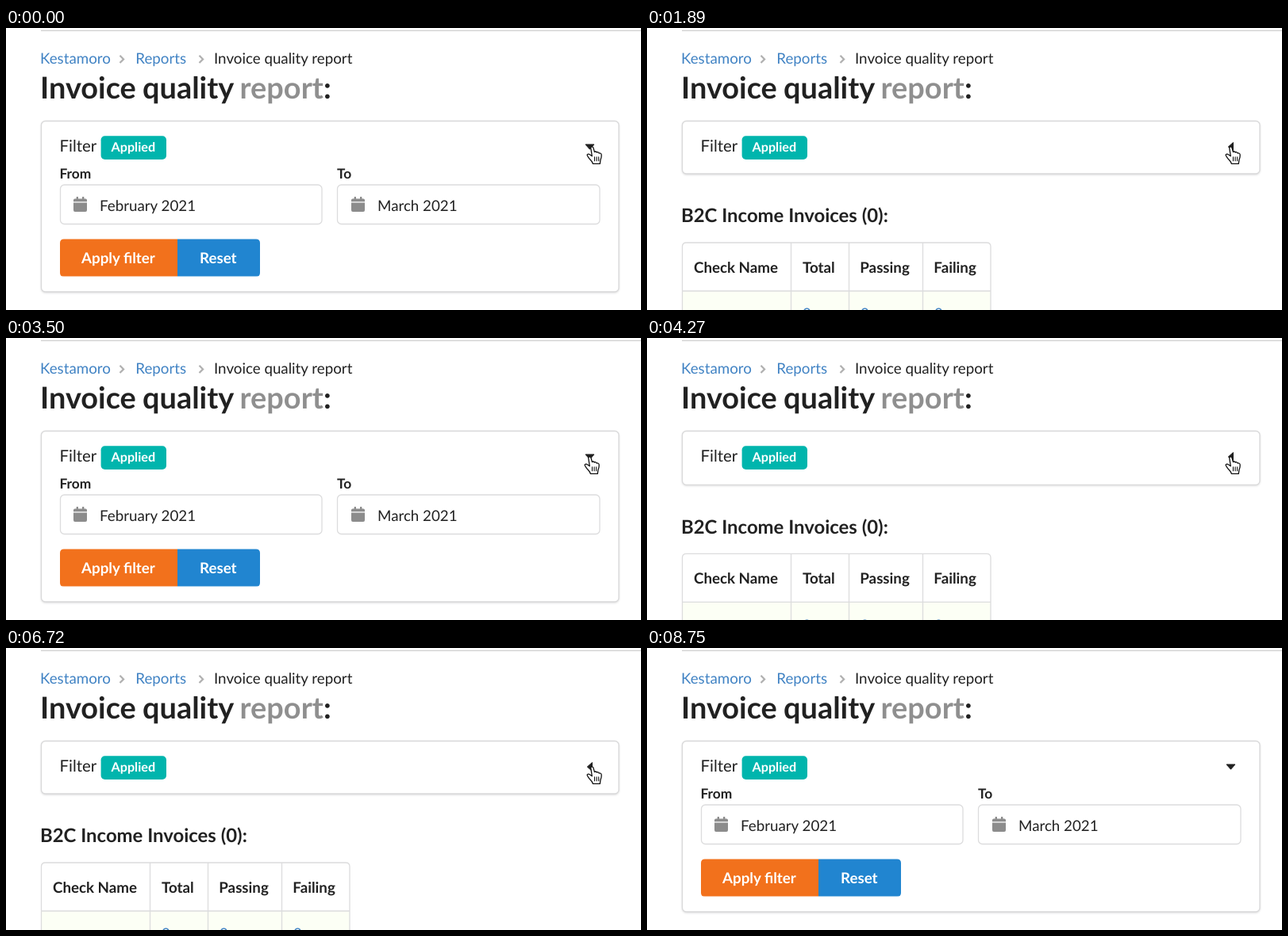
An HTML page that plays this animation: 800x356 px, repeating every 8.82 s.

```html
<!DOCTYPE html>
<html lang="en">
<head>
<meta charset="utf-8">
<title>Invoice quality report</title>
<style>
  html, body { margin: 0; width: 100%; height: 100%; overflow: hidden; background: #fff; }
  svg { display: block; width: 800px; height: 356px; }
  text { font: 18.75px Lato, sans-serif; fill: #212121; text-rendering: geometricPrecision; }
  .b { font-weight: 700; }
  .h1 { font-size: 37.9px; word-spacing: -1px; }
  .h3 { font-size: 23.9px; }
  .title { font-size: 20.4px; }
  .badge { font-size: 16.2px; }
  .label { font-size: 17.33px; }
  .link { fill: #4183c4; }
  .muted { fill: #8f8f8f; }
  .light { fill: #fff; }
  .chevron { fill: none; stroke: #b0b0b0; stroke-width: 2.2; }
  .line { fill: none; stroke: #dcdcdd; stroke-width: 1.3; }
  .field { fill: #fff; stroke: #dcdcdd; stroke-width: 1.3; }
  #box { fill: #fff; stroke: #d9d9da; stroke-width: 1.3; filter: drop-shadow(0 1.3px 1.2px rgba(34, 36, 38, .15)); }
</style>
</head>
<body>
<svg viewBox="0 0 800 356">
  <defs>
    <clipPath id="clip"><rect id="clipBox" x="44" y="166" width="728"/></clipPath>
    <g id="calendar" fill="#8c8c8c">
      <path d="M0 6.2V4.3Q0 2.4 1.9 2.4H3.6V.6Q3.6 0 4.2 0H5.4Q6 0 6 .6V2.4H11V.6Q11 0 11.6 0H12.8Q13.4 0 13.4 .6V2.4H15.1Q17 2.4 17 4.3V6.2Z"/>
      <path d="M0 7.4H17V17.1Q17 19 15.1 19H1.9Q0 19 0 17.1Z"/>
    </g>
  </defs>

  <path d="M44 3.3H800" stroke="#cfcfcf" stroke-width="1.3"/>
  <text class="link" x="43" y="45">Kestamoro</text>
  <path class="chevron" d="M143.5 34.8l4.6 4.6-4.6 4.6M243.5 34.8l4.6 4.6-4.6 4.6"/>
  <text class="link" x="163.3" y="45">Reports</text>
  <text x="262" y="45">Invoice quality report</text>
  <text class="b h1" x="43" y="89">Invoice quality <tspan class="muted">report</tspan>:</text>

  <g id="below">
    <text class="b h3" x="43" y="245.3">B2C Income Invoices (0):</text>
    <path d="M44.5 332H433V420H44.5Z" fill="#fcfff5"/>
    <path class="line" d="M44.5 420V276Q44.5 271 49.5 271H428Q433 271 433 276V420M44.5 332H433M181.5 271V420M254.5 271V420M347.5 271V420"/>
    <text class="b" x="59" y="308.5">Check Name</text>
    <text class="b" x="196" y="308.5">Total</text>
    <text class="b" x="268.3" y="308.5">Passing</text>
    <text class="b" x="361.3" y="308.5">Failing</text>
    <text class="link" x="196" y="367.3">0</text>
    <text class="link" x="269" y="367.3">0</text>
    <text class="link" x="362" y="367.3">0</text>
  </g>

  <rect id="box" x="44.5" y="117.5" width="727.5" rx="5"/>
  <text class="title" x="67.5" y="156.2">Filter</text>
  <rect x="119.6" y="136.3" width="82.4" height="29.7" rx="5" fill="#00b5ad"/>
  <text class="b badge light" x="132.5" y="156.4">Applied</text>
  <path id="caret" d="M730 147H741L735.5 153.2Z" fill="#212121" stroke="#212121" stroke-linejoin="round"/>

  <g clip-path="url(#clip)">
    <g id="content">
      <text class="b label" x="67.5" y="189.5">From</text>
      <text class="b label" x="417" y="189.5">To</text>
      <rect class="field" x="68.5" y="198" width="329.5" height="49.5" rx="5"/>
      <rect class="field" x="417.5" y="198" width="330.5" height="49.5" rx="5"/>
      <use href="#calendar" x="85" y="213"/>
      <use href="#calendar" x="435" y="213"/>
      <text x="118" y="230.5">February 2021</text>
      <text x="468" y="230.5">March 2021</text>
      <path d="M216 266.5V314H73Q68 314 68 309V271.5Q68 266.5 73 266.5Z" fill="#f2711c"/>
      <path d="M216 266.5V314H315Q320 314 320 309V271.5Q320 266.5 315 266.5Z" fill="#2185d0"/>
      <text class="b light" x="95" y="297">Apply filter</text>
      <text class="b light" x="244" y="297">Reset</text>
    </g>
  </g>

  <g id="hand" stroke="#111" stroke-width="1.3" stroke-linejoin="round" stroke-linecap="round">
    <path fill="#fff" transform="translate(-6 -.4)" d="M5.2 3C5.6 1.4 7.8 1.4 8.4 3L10 8.4C10.6 7.6 12.4 7.7 12.8 9C13.6 8.3 15.4 8.6 15.7 10C16.8 9.5 18.6 10.2 18.7 11.9C19 15 18.4 16.5 17.4 19L16.8 23.2H7.8C7.6 20.5 4.5 18.5 2.8 16C1.6 14.2 .6 13.2 .6 12C1 10.6 3 10.7 4 11.6L6.8 13.6Z"/>
    <path d="M4 14.4v4.8M6.6 14.4v4.8M9.2 14.4v4.8" stroke-width="1.1"/>
  </g>
  <path id="arrow" d="M0 0V17.5L4 13.8L7.1 21.4L10.2 20.1L7.1 12.8H12.3Z" fill="#111" stroke="#fff" stroke-width="1.2"/>
</svg>
<script>
const LOOP = 8820, STEP = 70, SLIDE = 350, FULL = 149;
const $ = id => document.getElementById(id);
const set = (id, attrs) => {
  for (const name in attrs) $(id).setAttribute(name, attrs[name]);
};

// Start times; the panel begins open and every click toggles it.
const clicks = [1358, 2546, 3953, 4650, 6250, 7050];

// time, x, y of the pointer's hot spot
const route = [
  [0, 737.5, 148.5], [900, 737.5, 148.5], [1100, 734.5, 148.5], [4970, 734.5, 148.5],
  [5250, 757, 163], [5850, 757, 163], [6150, 737.5, 148.5], [7420, 737.5, 148.5],
  [7700, 540, 70], [7840, 500, -26]
];

function panelAt(t) {
  const done = clicks.filter(c => c <= t);
  const open = done.length % 2 === 0;
  const p = done.length ? Math.min(1, (t - done[done.length - 1]) / SLIDE) : 1;
  const eased = 1 - (1 - p) ** 2;
  return { open, part: open ? eased : 1 - eased };
}

function pointerAt(t) {
  const i = route.findIndex(r => r[0] > t);
  if (i < 0) return null;
  const [t0, x0, y0] = route[i - 1], [t1, x1, y1] = route[i];
  const p = (t - t0) / (t1 - t0), s = p * p * (3 - 2 * p);
  return { x: x0 + (x1 - x0) * s, y: y0 + (y1 - y0) * s };
}

function drawPanel(t) {
  const { open, part } = panelAt(t);
  const h = FULL * part;
  set('box', { height: 66.5 + h });
  set('clipBox', { height: Math.max(0, h - 1.5) });
  set('below', { transform: `translate(0 ${h})` });
  set('content', { transform: `translate(0 ${-10.5 * (1 - part)})`, opacity: Math.sqrt(part) });
  set('caret', { transform: open ? '' : 'rotate(90 735.5 150)' });
}

function drawPointer(t) {
  const at = pointerAt(t);
  const overTitle = at && at.x < 748 && at.y > 135 && at.y < 166;
  const transform = at ? `translate(${at.x} ${at.y})` : '';
  set('hand', { transform, visibility: overTitle ? 'visible' : 'hidden' });
  set('arrow', { transform, visibility: at && !overTitle ? 'visible' : 'hidden' });
}

const start = performance.now();
function frame(now) {
  const t = Math.floor(Math.max(0, now - start) % LOOP / STEP) * STEP;
  drawPanel(t);
  drawPointer(t);
  requestAnimationFrame(frame);
}
frame(start);
</script>
</body>
</html>
```
